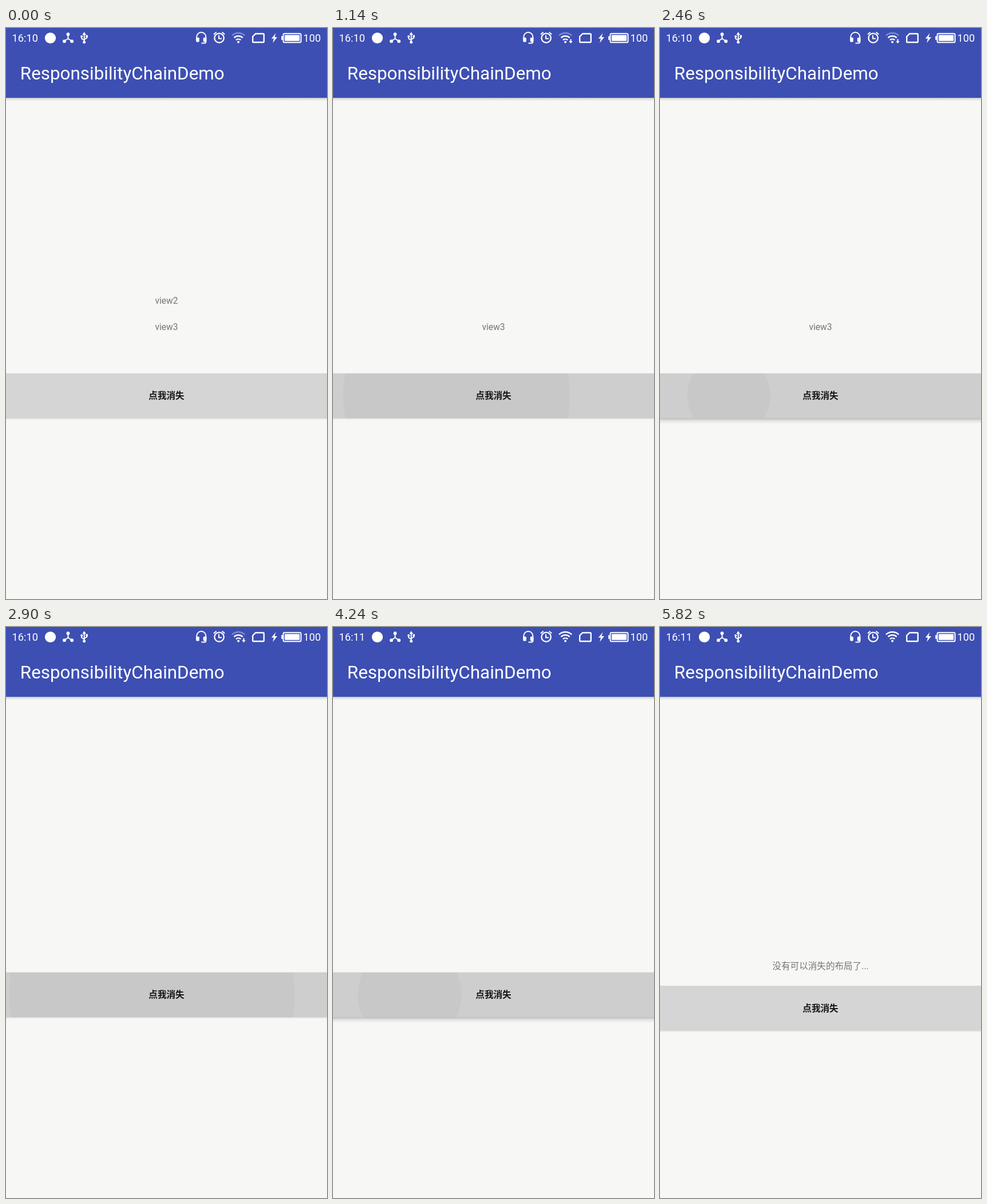
Write an HTML page that moves like this. It is 561 px wide and 998 px high and loops after 5.84 s.

```html
<!DOCTYPE html>
<html lang="zh">
<head>
<meta charset="utf-8">
<title>ResponsibilityChainDemo</title>
<style>
  html, body { margin: 0; width: 100%; height: 100%; overflow: hidden; background: #f7f7f5; }
  svg { display: block; width: 100vw; height: 100vh; }
  text { font-family: Roboto, "Noto Sans CJK SC", "Noto Sans CJK", sans-serif; font-size: 15.6px; }
  .label { fill: #767676; text-anchor: middle; }
  .line { fill: none; stroke: #fff; stroke-width: 2; }
</style>
</head>
<body>
<svg viewBox="0 0 561 998">
  <defs>
    <linearGradient id="shade" x2="0" y2="1">
      <stop offset="0" stop-color="#000" stop-opacity=".24"/>
      <stop offset=".4" stop-color="#000" stop-opacity=".09"/>
      <stop offset="1" stop-color="#000" stop-opacity="0"/>
    </linearGradient>
    <clipPath id="face"><rect width="561" height="78.5"/></clipPath>
  </defs>
  <rect width="561" height="998" fill="#f7f7f5"/>
  <rect y="121.5" width="561" height="6.5" fill="url(#shade)"/>
  <rect width="561" height="122" fill="#3d4fb3"/>
  <text x="24.8" y="90" fill="#fff" style="font-size:31.4px">ResponsibilityChainDemo</text>

  <g fill="#fff">
    <text id="clock" x="10.5" y="24" style="font-size:18.3px">16:10</text>
    <circle cx="77.5" cy="17.5" r="9.6"/>
    <!-- linked nodes -->
    <circle cx="108.5" cy="11" r="2.9"/>
    <circle cx="102" cy="23.2" r="2.9"/>
    <circle cx="115.2" cy="23.2" r="2.9"/>
    <path class="line" d="M108.5 11V18.5L102 23M108.5 18.5L115 23"/>
    <!-- cable -->
    <path class="line" d="M136.7 11V24M136.7 21.5L132.2 18.5V15M136.7 20L141.2 17.5V14"/>
    <path d="M136.7 7L140 12H133.4ZM139.4 12.5H143V16.2H139.4Z"/>
    <circle cx="132.2" cy="14.7" r="2"/>
    <circle cx="136.7" cy="24.8" r="2.5"/>
    <!-- headset with microphone -->
    <path class="line" d="M333.3 21V15.5A8 8 0 0 1 349.3 15.5V24Q349.3 26.6 346.8 26.6H341.5"/>
    <rect x="332.2" y="16.8" width="5.6" height="7.6" rx="1.4"/>
    <rect x="344.8" y="16.8" width="5.6" height="7.6" rx="1.4"/>
    <!-- alarm -->
    <circle class="line" cx="372.6" cy="17.5" r="8.2" style="stroke-width:2.3"/>
    <path class="line" d="M372 12.5V18.5H377M363 11.2L367.6 7.2M382.2 11.2L377.6 7.2"/>
    <!-- wifi -->
    <path id="outer" class="line" style="stroke-width:2.5" d="M395 13.2A16 16 0 0 1 417.2 13.2"/>
    <path class="line" style="stroke-width:2.4" d="M398.5 17.1A11 11 0 0 1 413.7 17.1M402 21A6 6 0 0 1 410.2 21"/>
    <circle cx="406.1" cy="24.4" r="2"/>
    <path id="arrow" stroke="#3d4fb3" paint-order="stroke" d="M414.4 19.5H416.6V23H418.8L415.5 27L412.2 23H414.4Z"/>
    <!-- card -->
    <path class="line" style="stroke-width:2.4" d="M436.2 10H449.2Q450.8 10 450.8 11.6V23.4Q450.8 25 449.2 25H432.8Q431.2 25 431.2 23.4V15Z"/>
    <!-- battery -->
    <path d="M471.5 9L463.8 18.6H468L466.2 26L474 16H469.4Z"/>
    <rect class="line" x="484.6" y="9.7" width="31" height="15.6" rx="2.4"/>
    <rect x="487" y="12.2" width="26.2" height="10.6" rx=".8"/>
    <rect x="481.2" y="14" width="2.6" height="7" rx="1"/>
    <text x="519.5" y="24" style="font-size:18.3px">100</text>
  </g>

  <text id="view2" class="label" x="280.5" y="482">view2</text>
  <text id="view3" class="label" x="280.5" y="528">view3</text>
  <text id="empty" class="label" x="280.5" y="597.7">没有可以消失的布局了...</text>

  <g id="button">
    <rect id="shadow" y="78.5" width="561" height="3" fill="url(#shade)"/>
    <rect width="561" height="78.5" fill="#d5d5d5"/>
    <g clip-path="url(#face)">
      <rect id="tint" width="561" height="79"/>
      <circle id="ripple" cy="39"/>
    </g>
    <text x="280.5" y="44.6" text-anchor="middle" fill="#151515" font-weight="700">点我消失</text>
  </g>
</svg>
<script>
const LOOP = 5840, PRESSES = [756, 2344, 4092], CLICK_DELAY = 150;
const TOUCH_X = 65, CENTER_X = 280.5, RADIUS = 283;
const $ = id => document.getElementById(id);
const clamp = v => Math.max(0, Math.min(1, v));
const set = (id, attrs) => {
  for (const k in attrs) $(id).setAttribute(k, attrs[k]);
};
const show = (id, on) => set(id, { visibility: on ? 'visible' : 'hidden' });
// rises from 0 to a, holds, then falls from b to c
const pulse = (t, a, b, c) => clamp(t / a) * (1 - clamp((t - b) / (c - b)));

function draw(t) {
  const clicks = PRESSES.filter(p => t >= p + CLICK_DELAY).length;
  const last = PRESSES.filter(p => t >= p).pop();
  const since = last === undefined ? -1 : t - last;

  show('view2', clicks < 1);
  show('view3', clicks < 2);
  show('empty', clicks > 2);
  set('button', { transform: `translate(0 ${clicks > 2 ? 627 : 603.5})` });

  const grow = 1 - (1 - clamp(since / 850)) ** 2;
  const fade = pulse(since, 120, 600, 1200);
  set('ripple', {
    cx: TOUCH_X + (CENTER_X - TOUCH_X) * grow,
    r: RADIUS * grow,
    opacity: 0.028 * fade
  });
  set('tint', { opacity: 0.036 * fade });
  const lift = pulse(since, 100, 200, 350);
  set('shadow', { height: 3 + 7 * lift, opacity: 0.6 + 0.4 * lift });

  $('clock').textContent = t < 3300 ? '16:10' : '16:11';
  show('arrow', t >= 600 && t < 4000);
  set('outer', { opacity: t < 4000 ? 0.35 : 1 });
}

const start = performance.now();
function tick() {
  draw((performance.now() - start) % LOOP);
  requestAnimationFrame(tick);
}
tick();
</script>
</body>
</html>
```
